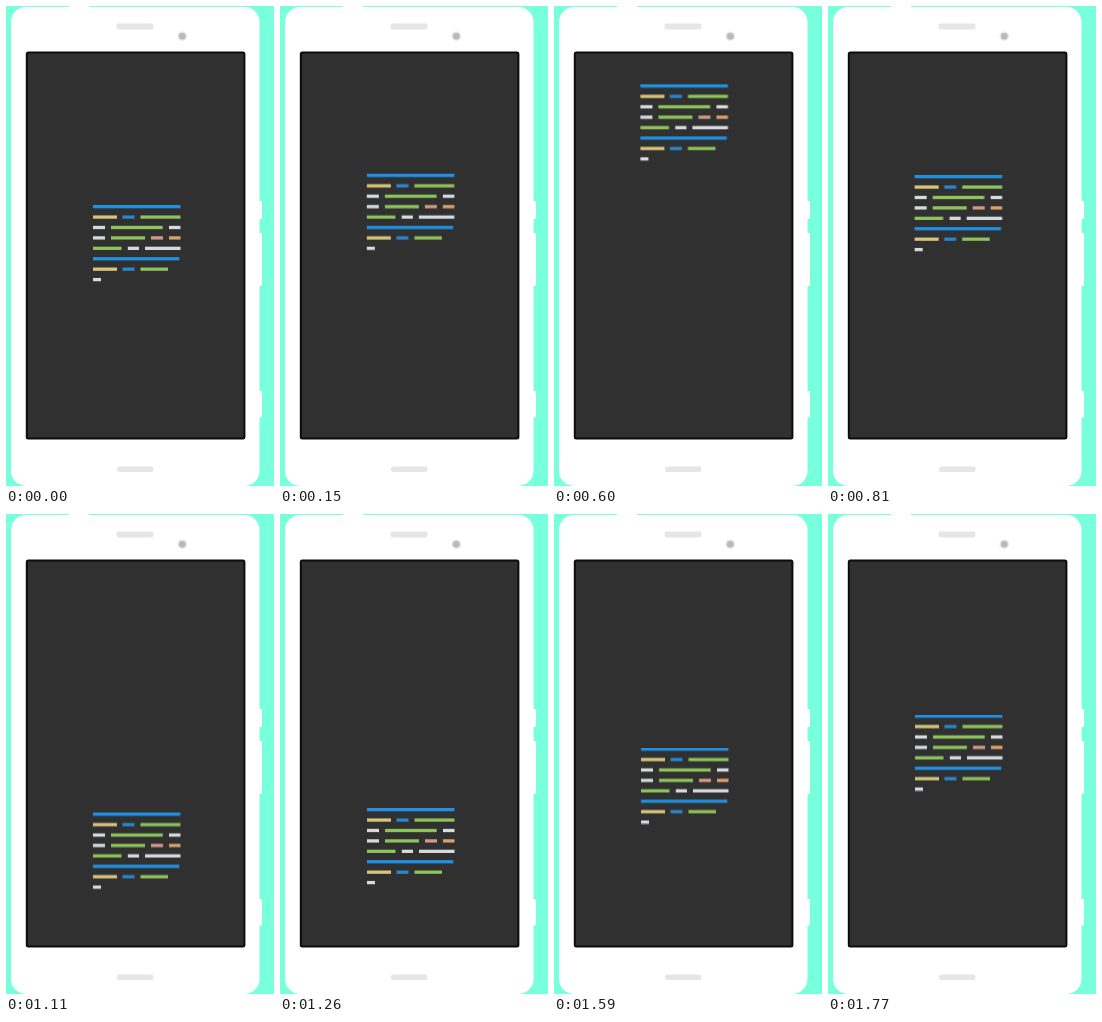
An HTML page for the animation above (1.8 s loop, 268 by 480 pixels).

```html
<!DOCTYPE html>
<html lang="en">
<head>
<meta charset="utf-8">
<title>Scrolling code on a phone</title>
<style>
  html, body { margin: 0; width: 100%; height: 100%; overflow: hidden; background: #78ffdc; }
  svg { display: block; width: 100vw; height: 100vh; }

  /* Slow climb, fast drop, slow climb back, in 30 ms steps */
  #code { animation: scroll 1800ms -2ms infinite; }
  @keyframes scroll {
    0%       { transform: translate(0, 0); animation-timing-function: steps(19); }
    31.6667% { transform: translate(-.6px, -118.8px); animation-timing-function: steps(1); }
    33.3333% { transform: translate(-.6px, -120.7px); animation-timing-function: steps(18); }
    63.3333% { transform: translate(0, 112.5px); animation-timing-function: steps(1); }
    65%      { transform: translate(0, 111.5px); animation-timing-function: steps(21); }
    100%     { transform: translate(0, -4px); }
  }

  .blue   { fill: #2190e0; }
  .link   { fill: #2a86cc; }
  .yellow { fill: #d6c47c; }
  .green  { fill: #8dc25c; }
  .white  { fill: #d6d9df; }
  .pink   { fill: #d29a86; }
  .orange { fill: #dba06c; }
</style>
</head>
<body>
<svg viewBox="0 0 268 480" preserveAspectRatio="none">
  <g fill="#fff">
    <rect x="5" y="1" width="248.5" height="479" rx="15"/>
    <rect x="63" y="-2" width="20" height="6" rx="2"/>
    <rect x="250" y="195" width="6" height="18" rx="1"/>
    <rect x="250" y="227" width="6" height="53" rx="1"/>
    <rect x="250" y="385" width="6" height="26.5" rx="1"/>
  </g>
  <g fill="#e6e6e6">
    <rect x="110.5" y="17.5" width="37" height="6" rx="2"/>
    <rect x="111" y="460.5" width="36.5" height="5.5" rx="2"/>
    <circle cx="176.3" cy="30.2" r="4.8"/>
  </g>
  <circle cx="176.3" cy="30.2" r="3.3" fill="#b9b9b9"/>
  <rect x="20.8" y="46.6" width="217.6" height="385.8" rx="1.5" fill="#303030" stroke="#0c0c0c" stroke-width="2"/>
  <g id="code"></g>
</svg>
<script>
  // Each row lists its bars as [colour, left, right].
  const rows = [
    [["blue", 87, 174.5]],
    [["yellow", 87, 111], ["link", 116.5, 128.5], ["green", 134.5, 174.5]],
    [["white", 87, 99], ["green", 105, 156.7], ["white", 163, 174.5]],
    [["white", 87, 99], ["green", 105, 139], ["pink", 145, 157], ["orange", 163, 174.5]],
    [["green", 87, 115.5], ["white", 121.8, 133], ["white", 139, 174.5]],
    [["blue", 87, 173.3]],
    [["yellow", 87, 111], ["link", 116.5, 128.5], ["green", 134.5, 162]],
    [["white", 87, 95]]
  ];
  const top0 = 199, pitch = 10.42, thick = 3.3;
  const code = document.getElementById("code");

  rows.forEach((bars, i) => bars.forEach(([colour, left, right]) => {
    const bar = document.createElementNS("http://www.w3.org/2000/svg", "rect");
    const attrs = { class: colour, x: left, y: top0 + i * pitch, width: right - left, height: thick };
    for (const name in attrs) bar.setAttribute(name, attrs[name]);
    code.append(bar);
  }));
</script>
</body>
</html>
```
